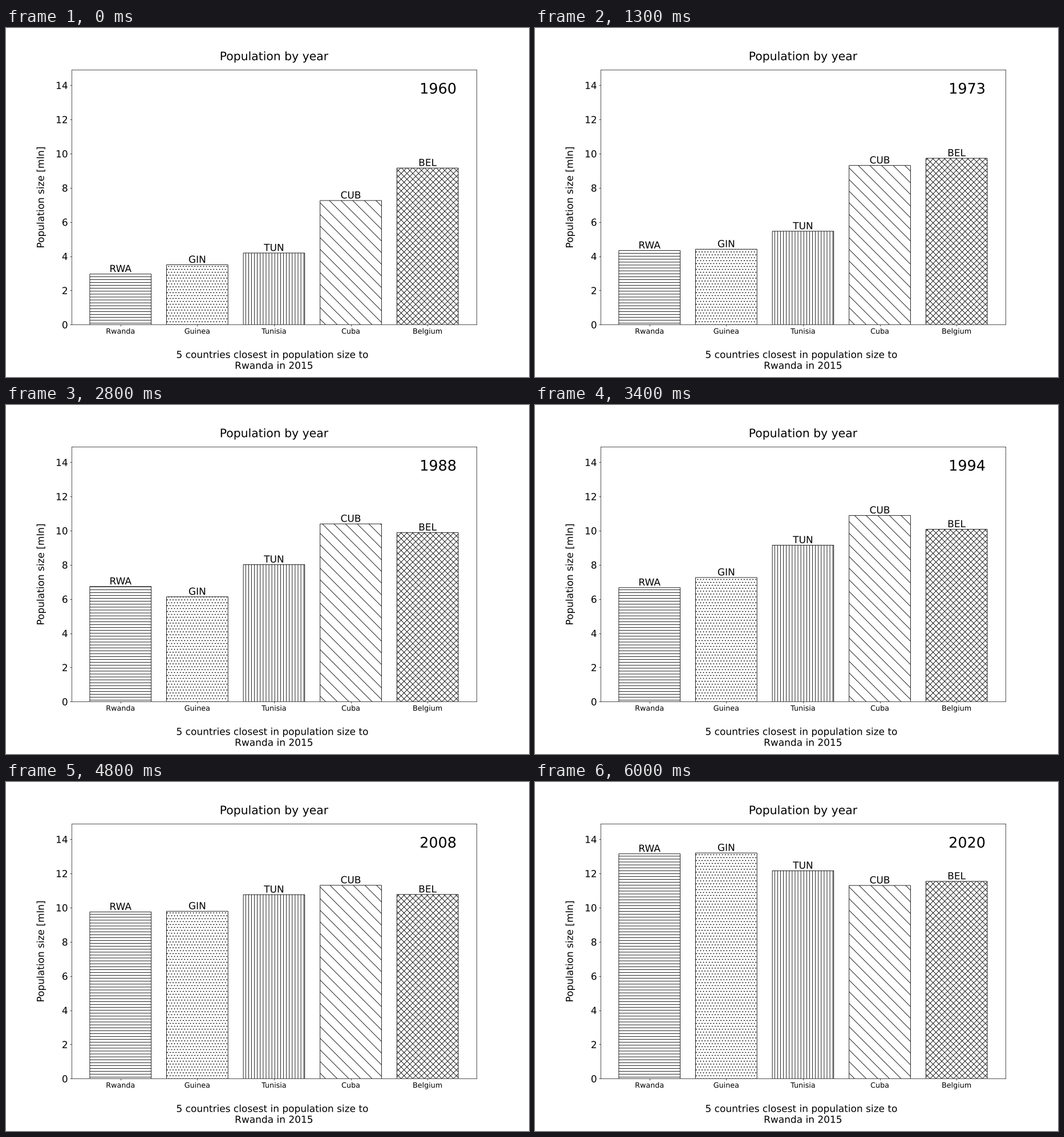
A matplotlib script for the animation above (6.1 s loop, 917 by 611 pixels).

```python
import matplotlib.pyplot as plt
import numpy as np
from matplotlib.animation import FuncAnimation
from matplotlib.collections import LineCollection
from matplotlib.patheffects import Normal
from matplotlib.text import Text
from matplotlib.transforms import Affine2D

plt.rcParams["font.family"] = "DejaVu Sans"
plt.rcParams["text.hinting"] = "none"

YEARS = np.arange(1960, 2021)
LABEL_GAP = 0.12

# name, code, hatch, turning points of the population in millions
COUNTRIES = [
    ("Rwanda", "RWA", "-",
     {1960: 2.96, 1993: 7.8, 1995: 5.7, 1998: 7.6, 2020: 13.15}),
    ("Guinea", "GIN", ".",
     {1960: 3.5, 1982: 5.18, 1994: 7.26, 2007: 9.55, 2020: 13.2}),
    ("Tunisia", "TUN", "|",
     {1960: 4.19, 1970: 5.06, 1992: 8.88, 1998: 9.72, 2020: 12.16}),
    ("Cuba", "CUB", "\\",
     {1960: 7.26, 1973: 9.31, 1981: 9.85, 1994: 10.89, 2006: 11.31, 2020: 11.3}),
    ("Belgium", "BEL", "x",
     {1960: 9.16, 1970: 9.7, 1988: 9.89, 2002: 10.34, 2012: 11.07, 2020: 11.54}),
]


def growth(points):
    """Constant yearly growth rate between turning points."""
    return np.exp(np.interp(YEARS, list(points), np.log(list(points.values()))))


def steps(low, high, step, shift=0):
    """Multiples of step that cover low to high."""
    return np.arange(np.floor(low / step), np.ceil(high / step) + 1) * step + shift


def hatch_lines(kind, x0, y0, x1, y1):
    """Segments that fill a box, in inches of the page."""
    if kind == "-":
        return [((x0, y), (x1, y)) for y in steps(y0, y1, 1 / 12, 1 / 24)]
    if kind == "|":
        return [((x, y0), (x, y1)) for x in steps(x0, x1, 1 / 12, 1 / 24)]
    if kind == ".":
        return [((x, y), (x + 1e-3, y))
                for y in steps(y0, y1, 1 / 12)
                for x in steps(x0, x1, 1 / 12, round(y * 12) % 2 / 24)]
    gap = 1 / 3 if kind == "\\" else 1 / 6
    lines = [((c - y0, y0), (c - y1, y1)) for c in steps(x0 + y0, x1 + y1, gap)]
    if kind == "x":
        lines += [((c + y0, y0), (c + y1, y1))
                  for c in steps(x0 - y1, x1 - y0, gap)]
    return lines


# 917 x 611 pixels
fig = plt.figure(figsize=(15.0082, 10), dpi=61.1, facecolor="white")
fig.subplots_adjust(left=0.125, right=0.9, bottom=0.15, top=0.88)
ax = fig.add_subplot()
ax.set_xlim(-0.64, 4.64)
ax.set_ylim(0, 14.9)
page = Affine2D().scale(1 / 15, 1 / 10) + fig.transFigure
to_page = ax.transData + page.inverted()

sizes = np.array([growth(points) for *_, points in COUNTRIES])
slots = np.arange(len(COUNTRIES))
bars = ax.bar(slots, sizes[:, 0], width=0.8, color="white",
              edgecolor="black", linewidth=1, snap=False)
hatches, labels = [], []
for slot, (_, code, kind, _) in zip(slots, COUNTRIES):
    box = to_page.transform([(slot - 0.4, 0), (slot + 0.4, 14.9)])
    hatch = LineCollection(hatch_lines(kind, *box.ravel()), colors="black",
                           linewidths=2.2 if kind == "." else 1,
                           capstyle="round", transform=page, snap=False)
    hatches.append(ax.add_collection(hatch, autolim=False))
    labels.append(ax.text(slot, 0, code, fontsize=20, ha="center", va="baseline"))

ax.set_xlim(-0.64, 4.64)
ax.set_ylim(0, 14.9)
ax.set_xticks(slots, [name for name, *_ in COUNTRIES])
ax.set_yticks(range(0, 15, 2))
ax.tick_params(axis="x", labelsize=15)
ax.tick_params(axis="y", labelsize=20)
ax.set_title("Population by year", fontsize=24, pad=20)
ax.set_ylabel("Population size [mln]", fontsize=20, va="baseline")
ax.yaxis.set_label_coords(-0.0677, 0.5)
ax.set_xlabel("5 countries closest in population size to \nRwanda in 2015",
              fontsize=20, va="baseline")
ax.xaxis.set_label_coords(0.5, -0.1734)
year_text = ax.text(0.95, 0.907, "", transform=ax.transAxes, fontsize=30,
                    ha="right", va="baseline")

# Text drawn as outlines keeps its exact, unrounded position
for text in fig.findobj(Text):
    text.set_path_effects([Normal()])


def update(i):
    for bar, hatch, label, size in zip(bars, hatches, labels, sizes[:, i]):
        bar.set_height(size)
        hatch.set_clip_path(bar)
        label.set_y(size + LABEL_GAP)
    year_text.set_text(str(YEARS[i]))
    return [*bars, *hatches, *labels, year_text]


def init():
    return update(0)


anim = FuncAnimation(fig, update, frames=len(YEARS), init_func=init,
                     interval=100, repeat=True, repeat_delay=0)
plt.show()
```
